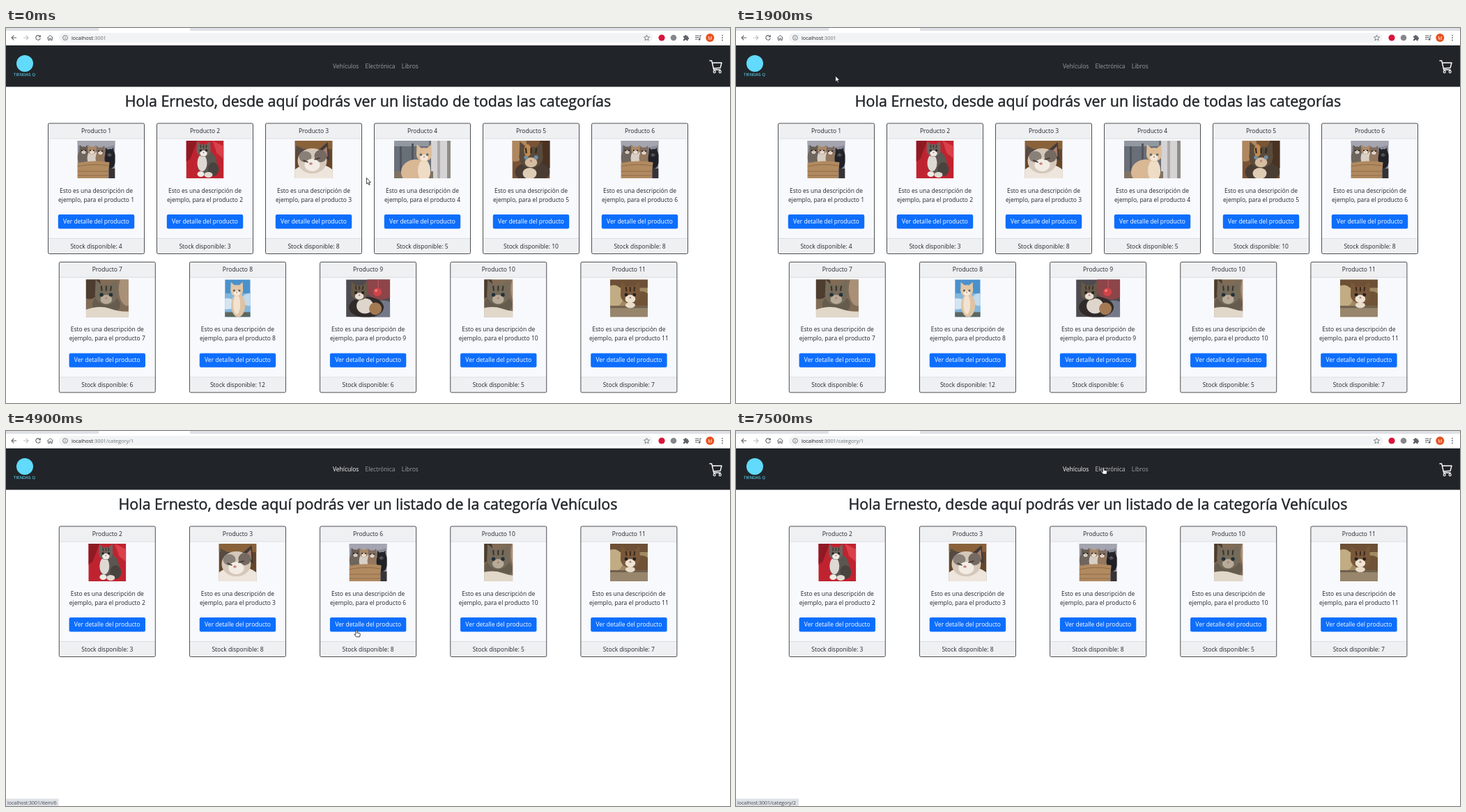
An HTML page that plays this animation: 1039x539 px, repeating every 8000 ms.

```html
<!DOCTYPE html>
<html lang="es">
<head>
<meta charset="utf-8">
<title>Tienda</title>
<style>
html, body { margin: 0; width: 100%; height: 100%; overflow: hidden; background: #fff; }
svg { display: block; }
text { font-family: "Open Sans", "Noto Sans", sans-serif; white-space: pre; }
.soft { filter: blur(.55px); }
</style>
</head>
<body>
<svg id="stage" width="100%" height="100%" viewBox="0 0 1039 539"></svg>
<script>
const INK = '#212529', DIM = '#9b9d9f', HOVER = '#c8c9ca', GREY = '#5f6368';
const stage = document.getElementById('stage');

const rect = (x, y, w, h, fill, extra = '') =>
  `<rect x="${x}" y="${y}" width="${w}" height="${h}" fill="${fill}" ${extra}/>`;
const oval = (x, y, rx, ry, fill) =>
  `<ellipse cx="${x}" cy="${y}" rx="${rx}" ry="${ry}" fill="${fill}"/>`;
const dot = (x, y, r, fill) => oval(x, y, r, r, fill);
const shape = (d, fill) => `<path d="${d}" fill="${fill}"/>`;
const line = (d, color, width, extra = '') =>
  `<path d="${d}" fill="none" stroke="${color}" stroke-width="${width}" ${extra}/>`;
const text = (x, y, content, size = 8.5, fill = INK, extra = 'text-anchor="middle"') =>
  `<text x="${x}" y="${y}" font-size="${size}" fill="${fill}" ${extra}>${content}</text>`;

// Kitten head: ears, fur, pale muzzle, eyes and nose, scaled by its radius.
function head(x, y, r, fur, muzzle, eye = '#222') {
  const ear = s => shape(`M${x + s * r * .2} ${y - r * .7}L${x + s * r * .95} ${y - r * 1.35}L${x + s * r} ${y}Z`, fur);
  return ear(-1) + ear(1) + oval(x, y, r, r * .9, fur) + oval(x, y + r * .42, r * .52, r * .42, muzzle) +
    dot(x - r * .42, y, r * .17, eye) + dot(x + r * .42, y, r * .17, eye) +
    dot(x, y + r * .3, r * .1, '#b98078');
}
const stripes = (x, y, r, color) =>
  [-.45, 0, .45].map(k => line(`M${x + k * r} ${y - r * .8}l${-k * 2} ${r * .45}`, color, r * .13)).join('');
const tabby = x => rect(x - 40, 0, 90, 54, '#806b56') + oval(x - 24, 8, 16, 20, '#4d3c2f') +
  oval(x + 30, 14, 12, 24, '#a99178') + oval(x, 36, 20, 15, '#665c4e') +
  head(x, 22, 16, '#746b5b', '#b7ab99', '#243038') + stripes(x, 22, 16, '#3a342c') +
  shape(`M${x - 40} 54V48Q${x - 14} 35 ${x + 6} 42T${x + 40} 44V54Z`, '#e2d8ca');

const photos = {
  1: [54, '#8b8c98', () => oval(27, 0, 34, 10, '#a4a5b0') +
    oval(9, 24, 9, 12, '#6e655e') + oval(22, 25, 8, 12, '#d9cfc5') +
    oval(34, 25, 8, 12, '#94785f') + oval(47, 26, 8, 14, '#202128') +
    head(9, 14, 6, '#665c55', '#d8cec4') + head(21, 14, 6, '#a98868', '#ebe3da') +
    head(33, 15, 6, '#826c5b', '#e4dbd1') + head(46, 18, 6, '#24252b', '#4b4a50') +
    shape('M0 32Q22 27 46 31L44 54H0Z', '#b18a60') +
    line('M0 37Q22 32 45 36M0 44H45M0 50H44', '#8d6a48', 1) + rect(45, 40, 9, 14, '#383335')],
  2: [54, '#c02330', () => shape('M0 0H16L6 26L0 30Z', '#8f1a24') + shape('M38 0L54 8V26L44 18Z', '#d9404a') +
    oval(30, 33, 14, 18, '#5b5651') + oval(23, 32, 7, 12, '#ded9d3') + oval(39, 41, 8, 10, '#49433f') +
    head(25, 14, 10, '#6c645d', '#eeeae5') + stripes(25, 14, 10, '#38332f') +
    oval(21, 48, 5, 4, '#eee9e4') + oval(32, 49, 6, 4, '#e1dad3')],
  3: [54, '#654629', () => rect(0, 0, 54, 12, '#89623a') + oval(27, 50, 31, 17, '#eee6dc') +
    shape('M3 27L2 7L23 17Z', '#544b47') + shape('M31 16L47 2L50 29Z', '#433b38') +
    shape('M37 17L46 8L47 23Z', '#a87f70') + oval(25, 29, 21, 18, '#d5c8ba') +
    oval(15, 23, 9, 8, '#898078') + oval(37, 22, 9, 9, '#756a62') + oval(25, 35, 11, 9, '#f2ece5') +
    line('M12 28L19 31M28 27L36 25', '#40352f', 1.5) + oval(23, 33, 2.4, 1.7, '#c6847c')],
  4: [81, '#696f78', () => rect(0, 0, 50, 8, '#9298a0') + rect(8, 8, 3, 40, '#50545e') + rect(25, 4, 3, 40, '#50545e') +
    rect(53, 0, 28, 54, '#d5d3d4') + rect(62, 0, 4, 54, '#aeaaa9') + rect(76, 0, 5, 54, '#8f8c88') +
    rect(0, 44, 56, 10, '#807364') + oval(31, 45, 21, 18, '#d9b895') + oval(43, 43, 9, 16, '#efdcc5') +
    head(43, 20, 11, '#dfbd98', '#f4e7d9', '#596d72')],
  5: [54, '#795437', () => oval(4, 8, 17, 22, '#b0875e') + oval(50, 15, 12, 26, '#493222') +
    oval(29, 45, 25, 15, '#493c32') + head(27, 24, 17, '#594b3c', '#d6bda0', '#6f8fa6') +
    oval(22, 14, 5, 9, '#c18a50') + stripes(27, 24, 17, '#302921') + oval(25, 47, 10, 8, '#dfccb5')],
  7: [61, '#806b56', () => tabby(29)],
  8: [36.5, '#4a91cc', () => rect(0, 20, 36.5, 34, '#82b6dd') + oval(3, 35, 13, 8, '#d3e5f2') +
    oval(34, 29, 9, 9, '#c1daed') + rect(0, 47, 36.5, 7, '#5d675f') +
    oval(19, 37, 10, 17, '#dfc3a3') + oval(17, 36, 5, 14, '#f2e3d0') +
    head(17, 16, 9, '#e3c6a5', '#f5e9da', '#5d665f')],
  9: [63, '#4e4b50', () => oval(50, 10, 23, 19, '#8c4548') + oval(52, 44, 20, 14, '#74798a') +
    oval(29, 40, 25, 15, '#302b2a') + oval(27, 38, 12, 11, '#ded5cc') + oval(42, 42, 9, 9, '#a47a53') +
    head(19, 19, 12, '#675847', '#e7ded4') + stripes(19, 19, 12, '#302b28') +
    line('M46 0V12', '#c65b5e', 1) + dot(45, 18, 6, '#d14349') + dot(43, 16, 2, '#ed7c7b')],
  10: [41, '#806b56', () => tabby(20)],
  11: [54, '#a18964', () => rect(0, 0, 54, 12, '#6d5035') + oval(5, 24, 14, 16, '#c1ac83') +
    oval(45, 31, 14, 14, '#705337') + head(29, 22, 14, '#79583a', '#eee4d4') +
    stripes(29, 22, 14, '#372719') + rect(0, 38, 54, 16, '#97866c') + rect(0, 38, 54, 3, '#6f604c') +
    oval(29, 37, 7, 4, '#e9ddca')],
};
photos[6] = photos[1];
const stock = [4, 3, 8, 5, 10, 8, 6, 12, 6, 5, 7];

function photo(id, cx, y) {
  const [w, back, draw] = photos[id];
  return `<svg x="${cx - w / 2}" y="${y}" width="${w}" height="54">${rect(0, 0, w, 54, back)}<g class="soft">${draw()}</g></svg>`;
}

function card(id, cx, y, hover = '') {
  const x = cx - 69;
  return rect(x, y, 138, 187.5, '#f8f9fc', 'rx="2"') +
    rect(x, y, 138, 22, '#eff0f2') + rect(x, y + 165.5, 138, 22, '#eff0f2') +
    line(`M${x} ${y + 22}h138m-138 143.5h138`, '#d3d5d7', .7) +
    rect(x, y, 138, 187.5, 'none', `rx="2" stroke="${INK}" stroke-width=".8"`) +
    text(cx, y + 14, `Producto ${id}`) + photo(id, cx, y + 25) +
    text(cx, y + 100, 'Esto es una descripción de') +
    text(cx, y + 113, `ejemplo, para el producto ${id}`) +
    rect(cx - 54.7, y + 131, 109.4, 20.4, '#0d6efd', `rx="2.2" ${hover}`) +
    text(cx, y + 144, 'Ver detalle del producto', 8.5, '#fff') +
    text(cx, y + 180, `Stock disponible: ${stock[id - 1]}`);
}

const row = (ids, start, step, y) =>
  ids.map((id, i) => card(id, start + step * i, y, id === 6 && y < 200 && ids.length === 5 ? 'id="button"' : '')).join('');
const heading = end => text(519.5, 113, `Hola Ernesto, desde aquí podrás ver un listado de ${end}`, 21.4, INK,
  `text-anchor="middle" stroke="${INK}" stroke-width=".45"`);

function browser() {
  return rect(0, 0, 1039, 4, '#dee1e6') + rect(133, 0, 131, 5, '#fff') +
    rect(76, 7, 852, 14, '#f1f3f4', 'rx="7"') +
    line('M15 14H8m3.3-3.3L8 14l3.3 3.3', GREY, 1.1) +
    line('M25 14h7m-3.3-3.3L32 14l-3.3 3.3', '#babcbe', 1.1) +
    line('M48.7 11.9A3.3 3.3 0 1 0 49.3 14.7M49.3 10.3v2.5h-2.5', GREY, 1.1) +
    line('M59.2 14.2l4.2-3.7 4.2 3.7M60.5 13.5v4h2v-2.6h1.8v2.6h2v-4', GREY, 1) +
    line('M88.4 14a3.4 3.4 0 1 0-6.8 0a3.4 3.4 0 1 0 6.8 0M85 13.5v2.4M85 12v.8', GREY, .8) +
    text(94, 17, 'localhost<tspan fill="#6c7075">:3001<tspan id="path"></tspan></tspan>', 7.4, '#202124', '') +
    line('M919.5 10.2l1.2 2.6 2.8.3-2.1 1.9.6 2.8-2.5-1.5-2.5 1.5.6-2.8-2.1-1.9 2.8-.3Z', GREY, .8) +
    dot(941, 14, 4.6, '#d9153c') + dot(958, 14, 4.3, '#85878a') +
    shape('M972 11.4h2a1.4 1.4 0 0 1 2.8 0h2v2.1a1.4 1.4 0 0 1 0 2.8v1.9h-2.2a1.3 1.3 0 0 0-2.6 0h-2v-2.2a1.3 1.3 0 0 0 0-2.6Z', GREY) +
    line('M989 11h5.5M989 13.5h5.5M989 16h3.5M996 16.3v-5.5h2', GREY, 1) + dot(995, 16.4, 1.4, GREY) +
    dot(1010.3, 14, 6, '#e8501e') + text(1010.3, 16.5, 'M', 6.8, '#fff') +
    [10.6, 14, 17.4].map(y => dot(1028, y, .9, GREY)).join('');
}

function navbar() {
  const links = [['Vehículos', 487.7], ['Electrónica', 537], ['Libros', 579.8]];
  return rect(0, 25, 1039, 59.5, INK) + dot(27, 51, 12, '#61dafb') +
    text(26.5, 69, 'TIENDAS Q', 5.7, '#61dafb', 'text-anchor="middle" style="font-family:\'DejaVu Sans\',sans-serif"') +
    links.map(([name, x], i) => text(x, 58, name, 8.45, DIM, `text-anchor="middle" id="link${i}"`)).join('') +
    line('M1009.5 47h3.2l3 13h10M1013.4 50h13.6l-1.9 7.2-9.8.8', '#fff', 1.4, 'stroke-linejoin="round"') +
    [1016.7, 1024.7].map(x => `<circle cx="${x}" cy="63" r="1.6" fill="none" stroke="#fff" stroke-width="1.1"/>`).join('');
}

stage.innerHTML = rect(0, 0, 1039, 539, '#fff') + browser() + navbar() +
  `<g id="all">${heading('todas las categorías')}${row([1, 2, 3, 4, 5, 6], 129.5, 156, 137)}${row([7, 8, 9, 10, 11], 145.3, 187.15, 336.4)}</g>` +
  `<g id="vehicles">${heading('la categoría Vehículos')}${row([2, 3, 6, 10, 11], 145.3, 187.15, 137)}</g>` +
  `<g id="status">${rect(0, 528.5, 90, 11, '#dee1e6', 'id="statusBox"')}${text(2, 537, '', 6.97, '#45494d', 'id="statusText"')}</g>` +
  `<g id="cursor" fill="#fff" stroke="#111" stroke-width=".8" stroke-linejoin="round">
    <path id="arrow" d="M.4.5V9.2L2.4 7.4 3.8 10.6 5.2 10 3.8 6.9H6.4Z"/>
    <path id="hand" d="M-1 .9a1 1 0 0 1 2 0V4l3.4.8q1.1.4.9 1.4l-.7 3.6H-.4L-3.1 6.4q.4-1.2 2.1 0Z"/></g>`;

const el = Object.fromEntries([...stage.querySelectorAll('[id]')].map(node => [node.id, node]));
const show = (node, on) => node.setAttribute('display', on ? 'inline' : 'none');

// Pointer moves: start, duration, x, y. The screen refreshes every 100 ms.
const moves = [
  [0, 100, 517, 215], [200, 100, 515.5, 215], [700, 500, 95, 14], [1200, 400, 491.5, 57],
  [1600, 500, 55, 71], [2200, 200, 458.5, 59], [2500, 100, 459, 59.5], [4500, 100, 590, 254],
  [4700, 100, 473.5, 292], [4900, 100, 503, 286], [5100, 100, 505.3, 281], [6800, 100, 491.5, 39.5],
  [7000, 100, 540, 68.5], [7300, 100, 541, 53], [7500, 100, 527.3, 52.3],
];

function pointer(t) {
  const i = moves.findLastIndex(m => m[0] <= t);
  const [start, duration, x, y] = moves[i];
  const [, , fromX, fromY] = moves[Math.max(0, i - 1)];
  const k = Math.min(1, (t - start + 100) / duration);
  return [fromX + (x - fromX) * k, fromY + (y - fromY) * k];
}

function draw(now) {
  const t = Math.floor(now % 8000 / 100) * 100;
  const during = (from, to) => t >= from && t < to;
  const inCategory = t >= 4500, overButton = during(4700, 6800);

  show(el.all, !inCategory);
  show(el.vehicles, inCategory);
  show(el.status, inCategory);
  el.path.textContent = inCategory ? '/category/1' : '';
  el.statusText.textContent = 'localhost:3001/' + (overButton ? 'item/6' : t >= 7000 ? 'category/2' : 'category/1');
  el.statusBox.setAttribute('width', overButton ? 75.5 : 90);
  el.button.setAttribute('fill', during(5100, 6800) ? '#0b5ed7' : '#0d6efd');
  el.link0.setAttribute('fill', inCategory ? '#fff' : during(1500, 1700) ? HOVER : DIM);
  el.link1.setAttribute('fill', t >= 7300 ? HOVER : DIM);

  const hand = during(1500, 1700) || overButton || t >= 7000;
  show(el.hand, hand);
  show(el.arrow, !hand);
  el.cursor.setAttribute('transform', `translate(${pointer(t)})`);
  requestAnimationFrame(draw);
}
draw(0);
</script>
</body>
</html>
```
